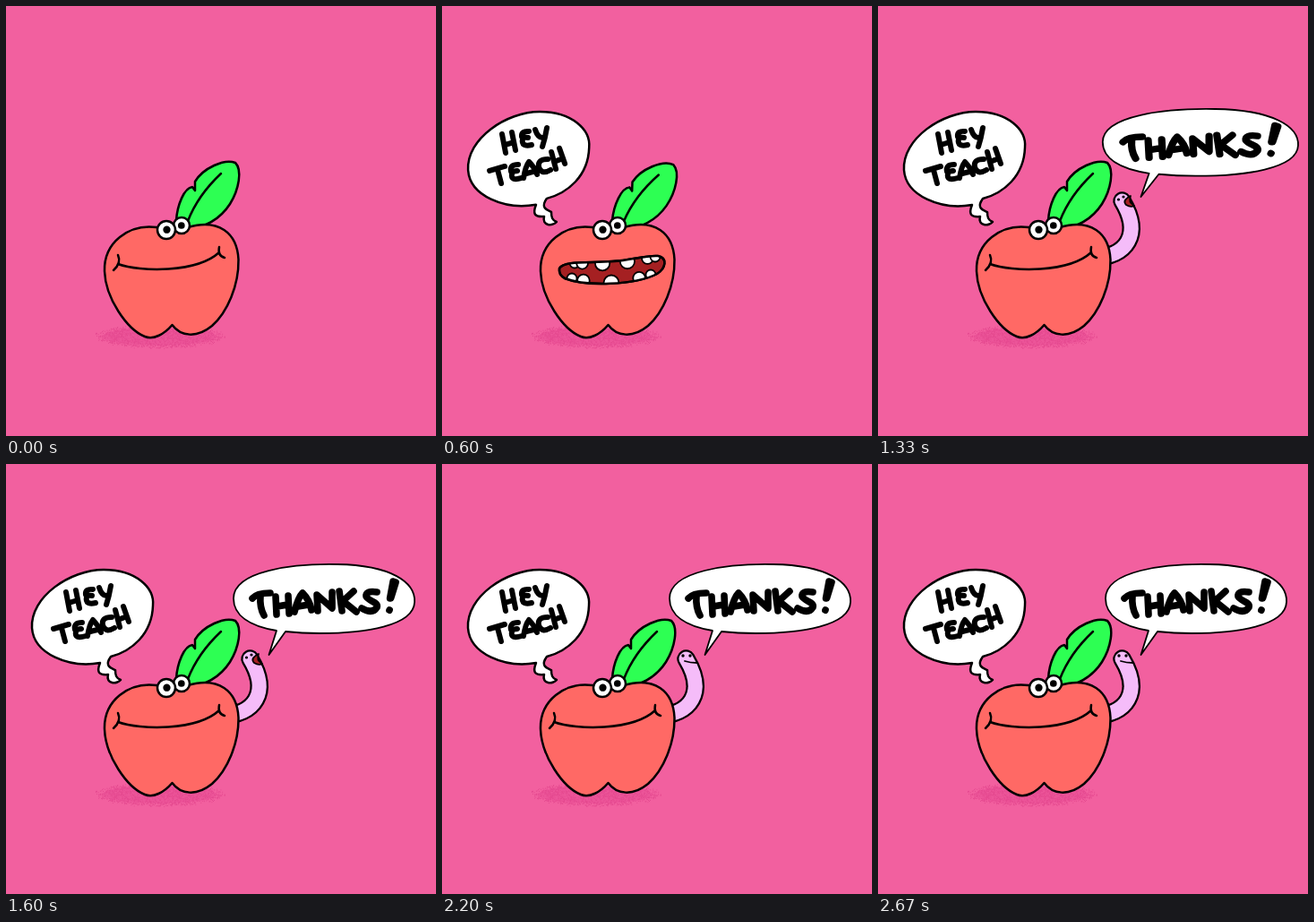
Animation, 480 px wide and 480 px high, one loop 2740 ms. Source, as an HTML page:

```html
<!DOCTYPE html>
<html lang="en">
<head>
<meta charset="utf-8">
<title>Hey teach, thanks!</title>
<style>
  html, body { margin: 0; width: 100%; height: 100%; overflow: hidden; background: #f2609f; }
  svg { display: block; width: 100vw; height: 100vh; }
  .ink { stroke: #000; stroke-width: 2.5; stroke-linecap: round; stroke-linejoin: round; }
  .ink, .ink * { vector-effect: non-scaling-stroke; }
  .thin { stroke-width: 1.8; }
  .line { fill: none; }
  .letters { fill: none; stroke: #000; stroke-width: 6; stroke-linecap: round; stroke-linejoin: round; }
  .loud { stroke-width: 7.6; }
  .worm { fill: none; stroke-linecap: round; }
</style>
</head>
<body>
<svg viewBox="0 0 480 480">
  <defs>
    <clipPath id="openClip"><path d="M133 278C134 271 155 275 180 273C205 272 218 265 228 265C237 266 236 278 225 287C209 303 150 307 137 293Q132 288 133 278Z"/></clipPath>
    <clipPath id="teethClip"><path d="M131 293C135 284 165 287 190 285C212 284 226 278 241 279C252 281 250 293 240 299C215 312 160 313 137 304Q130 300 131 293Z"/></clipPath>
  </defs>

  <ellipse cx="171" cy="369" rx="64" ry="10" fill="#ec5599"/>
  <path id="specks" stroke="#e4498f"/>

  <g id="worm">
    <path class="worm" stroke="#000" stroke-width="20.5" d="M240 281C278 280 295 255 272.500 217.500" pathLength="100"/>
    <path class="worm" stroke="#f5bcf9" stroke-width="16" d="M240 281C278 280 295 255 272.500 217.500" pathLength="100"/>
    <g id="wormShut">
      <circle cx="269" cy="214" r="1.700"/><circle cx="277" cy="214" r="1.700"/>
      <path class="ink thin line" d="M271 220Q277 222 285 222"/>
    </g>
    <g id="wormOpen">
      <circle cx="268.500" cy="216" r="1.600"/><circle cx="274" cy="213" r="1.600"/>
      <path class="ink thin" fill="#a52022" d="M282 212Q272 217 277 222Q282 225 286 223Q279 219 282 212Z"/>
    </g>
  </g>

  <g id="apple" class="ink">
    <g id="leaf" fill="#2dff53">
      <path d="M190 240C191 222 199 203 208 202L211 206L211 196C220 181 244 170 256 175C264 183 260 205 250 221C241 235 226 247 200 250Z"/>
      <path class="line" d="M203 240C210 222 223 203 240 187"/>
    </g>
    <path fill="#ff6965" d="M185.500 356C177 366 165 373 155 369C135 361 111 326 110 296C109 264 137 243 168 247Q186 255 203 247C237 237 258 253 259.500 283C260 312 247 342 230 357C213 371 195 369 185.500 356Z"/>
    <g fill="#fff"><circle cx="196" cy="245" r="9"/><circle cx="179" cy="250" r="10"/></g>
    <circle cx="195.800" cy="245" r="2.600"/><circle cx="179.500" cy="249.700" r="2.900"/>
    <path id="smile" class="line" d="M125 278Q129 287 120 295M125 288C150 297 213 298 238 275M238 269Q236 279 244 281"/>
    <g id="open"></g>
    <g id="teeth"></g>
  </g>

  <g id="hello">
    <path id="helloShape" class="ink" fill="#fff"/>
    <g class="letters" role="img" aria-label="Hey teach">
      <path id="hey" d="M67 143L71 164M78 141L82 161M70 155L80 152M97 140Q88 139 89 146L96 147M90 148Q88 158 100 155M104 138Q107 147 112 147M117 136Q115 148 112 157"/>
      <path id="teach" d="M53 184L70 179M62 183L66 198M85 177Q75 177 77 185L84 184M78 187Q76 196 89 192M91 192Q93 179 97 174Q103 180 106 188M94 187L102 185M118 171Q106 171 108 180Q111 189 121 183M122 163L127 182M131 159L137 176M125 174L135 170"/>
    </g>
  </g>

  <g id="thanks">
    <path class="ink thin" fill="#fff" d="M302 186C272 181 254 169 254 150C254 119 320 111 370 112C430 113 457 132 456 154C455 181 400 189 350 189Q330 189 312 187L293.500 213Z"/>
    <g class="letters loud" role="img" aria-label="Thanks!">
      <path d="M275 150Q280 144 295 144M284 148Q283 160 288 169M301 148L302 168M315 147L316 167M303 159L314 157M322 165Q326 149 331 144Q339 152 341 163M326 159L338 157M348 164L347 146L364 161L364 143M372 142L375 164M388 142L376 153L391 165M414 143Q401 141 402 148C406 154 416 154 414 160Q409 168 397 161M428 163L427.900 163.200"/>
      <path fill="#000" d="M432 131L435 132L429.500 150L428.500 150Z"/>
    </g>
  </g>
</svg>

<script>
const LOOP = 2740, STEP = 200 / 3;
const HOP = 3, LAND = 7, HUSH = 11, EMERGE = 13, REPLY = 19, REPLY_END = 26;
const { sin, cos, exp, sqrt, min, max, PI } = Math;
const $ = id => document.getElementById(id);
const show = (id, on) => $(id).style.display = on ? '' : 'none';
const set = (id, transform) => $(id).setAttribute('transform', transform);
const clamp = x => min(1, max(0, x));

// Half sine wave between two steps, zero outside them.
const bump = (n, from, to) => sin(PI * clamp((n - from) / (to - from)));
// Damped wobble that is 1 at its peak.
const wobble = n => cos(1.2 * n) * exp(-.6 * n);

// Blends two paths that share the same commands.
function blend(from, to, k) {
  const target = to.match(/\d+/g);
  let i = 0;
  return from.replace(/\d+/g, v => (+v + (target[i++] - v) * k).toFixed(2));
}

// Row of teeth, larger and wider apart in the middle.
function teethRow(count, x0, y0, x1, y1, sag) {
  return Array.from({ length: count }, (_, i) => {
    const u = (1 - cos(PI * i / (count - 1))) / 2, mid = sin(PI * u);
    return `<circle cx="${x0 + (x1 - x0) * u}" cy="${y0 + (y1 - y0) * u + sag * mid}" r="${5.5 + 3 * mid}"/>`;
  }).join('');
}
function buildMouth(id, teeth) {
  const d = $(id + 'Clip').firstElementChild.getAttribute('d');
  $(id).innerHTML = `<path d="${d}" fill="#a52022"/><g clip-path="url(#${id}Clip)" fill="#fff" class="thin">${teeth}</g><path d="${d}" class="line"/>`;
}
buildMouth('open', teethRow(5, 141, 273, 224, 266, 4));
buildMouth('teeth', teethRow(6, 148, 287, 238, 280, 3) + teethRow(5, 145, 304, 233, 300, 7));

// Grainy shadow
let seed = 7, dots = '';
const random = () => (seed = seed * 16807 % 2147483647) / 2147483647;
for (let i = 0; i < 1500; i++) {
  const a = random() * 2 * PI, r = sqrt(random()) * (.9 + random() * .18);
  dots += `M${(171 + cos(a) * r * 70).toFixed(1)} ${(369 + sin(a) * r * 13).toFixed(1)}h1`;
}
$('specks').setAttribute('d', dots);

const bubbleRest = 'M105 222C70 228 31 212 29 183C27 148 72 118 109 118C145 118 166 138 164 158C163 190 140 209 117 215C109 226 118 228 122 230C122 236 123 239 128 241C124 246 111 246 114 235C103 236 101 232 105 222Z';
const bubbleSwing = 'M108 198C90 220 46 243 44 206C44 165 80 121 118 121C152 121 190 150 191 176C192 215 134 190 117 196C112 212 119 215 122 220C124 227 120 234 117 238C108 242 112 230 116 223C104 220 106 214 108 198Z';

function draw(time) {
  const n = Math.floor((time % LOOP + 8) / STEP);
  const boil = (n >> 1) % 2 * .5;

  // Apple hop
  const hop = bump(n, HOP, LAND);
  const crouch = bump(n, 0, HOP + 1) + .6 * bump(n, LAND - 1, LAND + 2);
  const tall = 1 + .035 * hop - .06 * crouch;
  set('apple', `translate(${185 - hop} ${370 - 14.5 * hop}) scale(${2 - tall} ${tall}) translate(-185 -370)`);
  const droop = 25 * hop + 2 * bump(n, LAND, HUSH);
  set('leaf', `translate(198 240) rotate(${droop - 47}) scale(${1 - .09 * hop} ${1 - .33 * hop}) rotate(47) translate(-198 -240)`);
  show('open', n > HOP && n < LAND);
  show('teeth', n >= LAND && n < HUSH);
  show('smile', n <= HOP || n >= HUSH);

  // First bubble
  show('hello', n > HOP);
  const swing = wobble(n - 5);
  set('hello', `translate(${118 - boil} 238) scale(${clamp((n - HOP) * .65)}) translate(-118 -238)`);
  $('helloShape').setAttribute('d', blend(bubbleRest, bubbleSwing, swing));
  set('hey', `translate(${92 + 4 * swing} ${150 + swing}) skewY(${-13 * swing}) scale(1 ${1 - .15 * swing}) translate(-92 -150)`);
  set('teach', `translate(${95 + 15 * swing} ${179 - 4 * swing}) skewY(${-4 * swing}) scale(${1 + .06 * swing} 1) translate(-95 -179)`);

  // Worm
  show('worm', n > EMERGE);
  const reach = 100 * clamp((n - EMERGE) / (REPLY - EMERGE)) ** 1.7;
  for (const body of document.querySelectorAll('.worm'))
    body.setAttribute('stroke-dasharray', `${reach} 300`);
  show('wormOpen', n >= REPLY && n < REPLY_END);
  show('wormShut', n >= REPLY_END);

  // Second bubble
  show('thanks', n >= REPLY);
  const pop = wobble(n - REPLY - 1), grow = clamp((n - REPLY + 1) * .7);
  set('thanks', `translate(${294 + boil} 212) scale(${grow * (1 + .08 * pop)} ${grow * (1 - .03 * pop)}) translate(-294 -212)`);
}

function tick() {
  draw(performance.now());
  requestAnimationFrame(tick);
}
tick();
</script>
</body>
</html>
```
